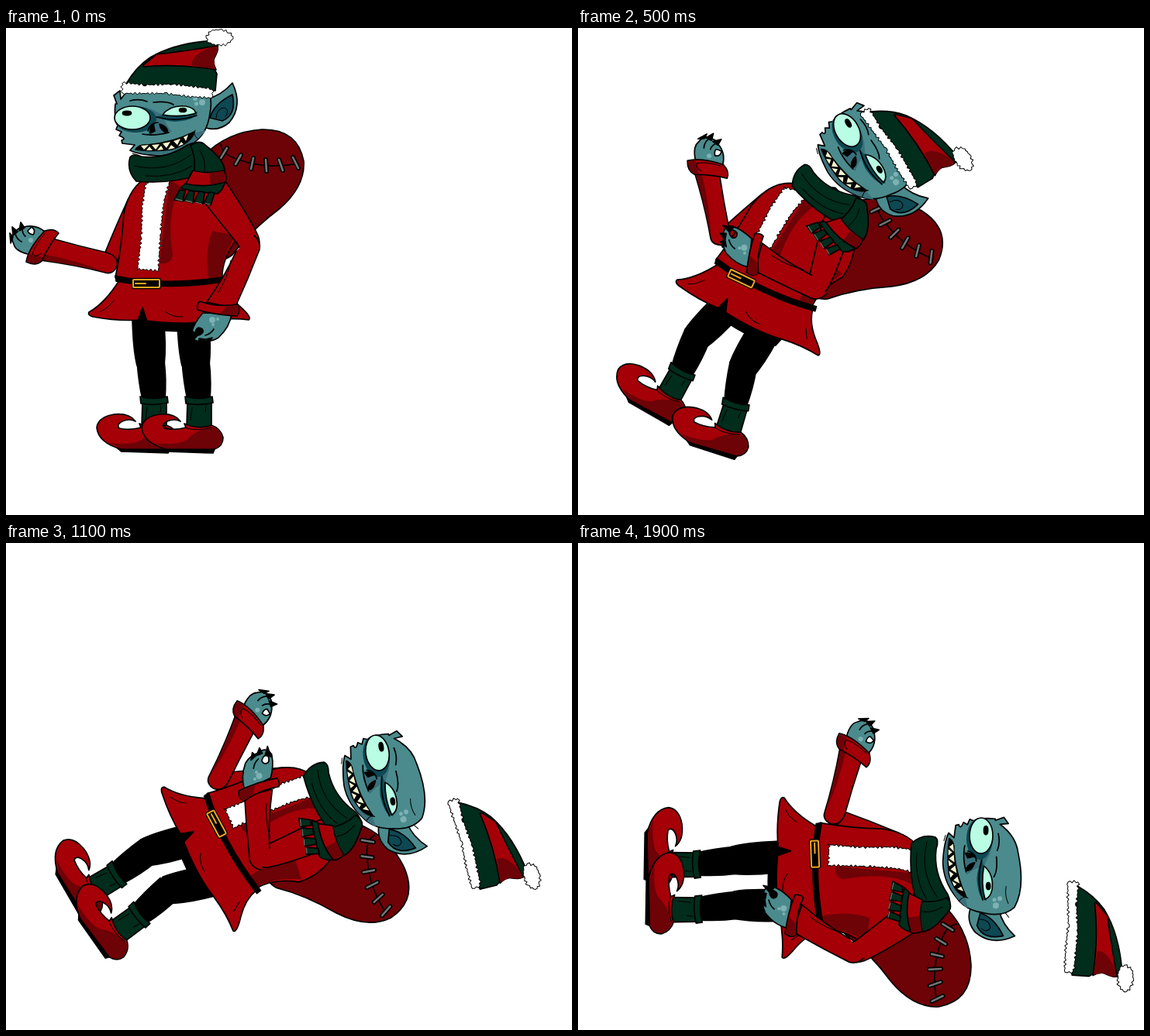
These frames come from a looping animation (730x629 px, 2000 ms). An HTML page:

```html
<!DOCTYPE html>
<html lang="en">
<head>
<meta charset="utf-8">
<title>Falling elf</title>
<style>
html, body { margin: 0; width: 100%; height: 100%; overflow: hidden; background: #fff; }
svg { display: block; width: 730px; height: 629px; stroke: #000; stroke-width: 1.7; stroke-linejoin: round; stroke-linecap: round; }
.red { fill: #a50007; }
.wine { fill: #6d0207; }
.green { fill: #012d1c; }
.skin { fill: #4b8b8d; }
.shade { fill: #39707b; }
.deep { fill: #0d4853; }
.mint { fill: #b9fde4; }
.white { fill: #fff; }
.teeth { fill: #f6f7cf; }
.dots { fill: #7db1b4; }
.flat { stroke: none; }
.line { fill: none; }
.fine { fill: none; stroke-width: 1; }
</style>
</head>
<body>
<svg viewBox="0 0 730 629">
<defs>
  <!-- both legs share these, drawn around the ankle -->
  <path id="thigh" d="M-28-102L12-102Q16-70 13-42Q-4-32-22-42Q-27-62-28-102Z"/>
  <g id="shin">
    <path d="M-22-48Q-20-20-15 2L14 2Q16-25 13-48Q-5-58-22-48Z"/>
    <path class="green" d="M-15 4L-16 38Q0 42 16 36L16 4Z"/>
    <path class="green" d="M-18-2Q0 3 17-2L18 6Q0 10-17 7Z"/>
    <path class="fine" d="M-9 12L-11 28M9 10L8 18"/>
    <path d="M-48 64L20 66L18 71L-42 69Z"/>
    <path class="red" d="M-17 38Q-32 42-45 39Q-49 34-41 30Q-32 26-24 30Q-32 19-52 21Q-72 24-74 38Q-72 58-42 66L20 66Q31 62 31 51Q28 39 16 35Q0 41-19 33Z"/>
    <path class="wine flat" d="M-58 58Q-20 62-12 50Q-2 42 16 37Q28 40 30 51Q30 62 20 65L-42 65Z"/>
    <path class="fine" d="M-16 39Q0 43 15 38"/>
  </g>
  <path id="stitches" d="M285 155L277 168M303 164L296 176M319 168L316 182M335 170L336 185M352 170L357 184M370 167L377 181"/>
</defs>

<!-- sack -->
<g data-pivot="327 168" data-x="327 392 420 453 478 488 470" data-y="168 223 265 341 430 533 542" data-a="0 23 33.5 53.7 67.5 81 90.5">
  <path class="wine" d="M255 165Q285 134 330 131Q376 130 384 172Q386 205 352 234Q315 262 292 293Q270 310 250 285Q235 225 255 165Z"/>
  <path class="line" d="M277 150Q279 164 300 170Q335 183 377 175"/>
  <use href="#stitches" stroke-width="6"/>
  <use href="#stitches" stroke="#737373" stroke-width="2.6"/>
</g>

<!-- far leg -->
<g data-pivot="0 0" data-x="191 150 135 123 145 163 156" data-y="478 461 442 421 427 453 415" data-a="0 20 28 44 58 70 89">
  <g data-pivot="-4 -45" data-a="0 17 20 33 20 29 0"><use href="#thigh"/></g>
  <use href="#shin"/>
</g>
<!-- near leg -->
<g data-pivot="0 0" data-x="249 222 204 169 174 178 158" data-y="478 485 484 469 479 506 473" data-a="0 6 16 35 53 71 89">
  <g data-pivot="-4 -45" data-a="0 18 18 31 29 29 5"><use href="#thigh"/></g>
  <use href="#shin"/>
</g>

<!-- body with both arms -->
<g data-pivot="107 369" data-x="107 117 127 154 202 248 264" data-y="369 342 327 300 316 356 329" data-a="0 15.5 25.5 46.3 61.6 76.7 88">
  <path class="red" d="M158 220Q142 255 127 292L142 304L178 232Z"/>
  <path d="M165 372L262 376L258 389Q215 396 166 385Z"/>
  <path class="red" d="M184 192Q159 204 152 240Q149 285 141 322Q210 338 279 326Q277 300 298 272Q305 235 280 205Q265 180 240 172Z"/>
  <path class="wine flat" d="M262 328Q255 290 266 262L296 268Q276 300 278 325Z"/>
  <path class="wine flat" d="M211 196L226 205Q206 235 215 294Q212 306 198 304Z"/>
  <path class="white" stroke-width="1" data-fur="180 199 175 230 174 270 169 312 197 314 200 262 204 225 213 193"/>
  <path class="red" d="M146 326Q128 355 107 367Q105 371 112 373Q145 379 172 377L176 362L180 378Q230 384 262 378Q290 374 313 377Q318 374 301 359Q284 343 281 325Q210 340 146 326Z"/>
  <path d="M176 361L170 378L182 379Z"/>
  <path class="fine" d="M122 366Q132 362 139 352M284 352L291 364M205 366Q215 374 228 373"/>
  <path d="M141 320Q205 334 284 321L285 327Q210 340 142 327Z"/>
  <rect x="164" y="325" width="34" height="10" rx="1" stroke="#000" stroke-width="4.5"/>
  <rect x="164" y="325" width="34" height="10" rx="1" stroke="#efa524" stroke-width="2"/>
  <path d="M167 330H180" stroke="#efa524" stroke-width="2"/>

  <!-- far forearm -->
  <g data-pivot="135 304" data-y="304 299 294 300 304 304 304" data-a="0 25.5 40 53 41 30 4.6">
    <path class="skin" fill-rule="evenodd" d="M50 263Q38 253 23 257Q16 257 9 266Q6 272 10 279Q12 288 28 292L42 290ZM33 257Q39 261 35 267Q29 266 28 262Z"/>
    <path d="M24 258L19 251L17 262ZM15 263L8 257L9 268ZM9 270L5 265L6 278Z"/>
    <path class="line" d="M21 259Q21 266 25 269M12 266Q14 273 20 276"/>
    <path class="dots flat" d="M29 274a3 3 0 1 0 6 0a3 3 0 1 0-6 0"/>
    <path class="red" d="M60 272Q95 282 130 290Q146 295 143 308Q138 319 128 316Q90 306 44 300Z"/>
    <path class="wine flat" d="M47 292Q92 300 127 315Q90 306 44 299Z"/>
    <path class="red" d="M50 262Q62 258 68 265Q57 278 46 301Q38 308 26 302Q29 284 50 262Z"/>
    <path class="wine flat" d="M29 292L47 296L44 302Q36 306 28 301Z"/>
    <path class="fine" d="M50 266Q38 279 34 292Q38 297 46 291"/>
  </g>

  <!-- near arm -->
  <g data-pivot="256 200" data-a="0 14.5 26.5 40 41.4 27.5 3">
    <path class="red" d="M283 198Q314 244 325 268Q331 284 318 290Q305 293 298 278L258 228Q240 208 256 194Z"/>
    <g data-pivot="315 285" data-a="0 27 41 58.5 49.6 30.6 4.5">
      <path class="skin" fill-rule="evenodd" d="M254 368L291 369Q289 386 274 400Q264 406 254 404Q240 407 239 394Q243 380 254 368ZM248 387Q255 387 254 393Q249 399 244 396Q244 389 248 387Z"/>
      <path d="M241 392L239 406L247 397ZM249 401L249 409L257 402ZM258 402L260 408L266 400Z"/>
      <path class="line" d="M257 397Q264 395 268 389"/>
      <path class="dots flat" d="M262 377a4 4 0 1 0 8 0a4 4 0 1 0-8 0M271 376a2 2 0 1 0 4 0a2 2 0 1 0-4 0M265 383a2 2 0 1 0 4 0a2 2 0 1 0-4 0"/>
      <path class="red" d="M297 288Q284 318 259 354L295 362Q312 325 327 286Q329 276 320 268"/>
      <path class="fine" d="M290 300Q286 322 274 341"/>
      <path class="red" d="M250 353Q272 361 298 357Q304 364 298 372Q270 371 247 364Q246 356 250 353Z"/>
      <path class="wine flat" d="M284 360L299 358Q303 365 297 371L276 369Z"/>
    </g>
  </g>
</g>

<!-- head -->
<g data-pivot="163 116" data-x="163 286 347 415 479 522 520" data-y="116 110 132 188 271 372 378" data-a="0 43.2 59.3 71 81.2 90.3 90.7">
  <path class="skin" d="M258 92Q277 88 292 71Q306 100 288 122Q274 134 258 129Z"/>
  <path class="deep" d="M263 116Q268 98 292 86Q298 112 279 120Z"/>
  <path class="fine" d="M271 116Q272 103 282 103Q289 107 283 114"/>
  <path class="skin" d="M143 98L139 87L147 81L148 92Q163 71 185 68Q230 58 255 72Q268 86 263 110Q260 136 242 148Q222 164 198 165Q172 164 160 158L166 151L150 149L149 145Q156 143 146 139L149 134L142 131L144 126Q139 116 141 98Z"/>
  <path class="shade flat" d="M164 158Q210 162 244 135L258 132Q244 150 222 159Q194 168 164 158ZM184 103Q200 119 182 137Q194 142 214 134Q205 124 202 112Z"/>
  <ellipse class="deep flat" cx="167" cy="118" rx="27" ry="17"/>
  <ellipse class="mint" cx="163" cy="116" rx="23" ry="15"/>
  <ellipse cx="156" cy="110" rx="5.5" ry="2.6"/>
  <path class="deep flat" d="M194 114Q220 110 247 108Q246 119 218 121Q204 120 194 114Z"/>
  <path class="mint" d="M202 112Q212 99 232 101Q243 103 245 110Q225 116 202 112Z"/>
  <ellipse cx="228" cy="106" rx="4.5" ry="2.5"/>
  <path class="line" d="M194 115Q220 122 246 113M190 96Q208 94 216 99M176 137Q190 140 210 135M182 95Q172 91 160 94"/>
  <path d="M190 124Q184 131 186 136L192 133ZM198 124Q200 134 208 135Q210 128 198 124Z"/>
  <path class="line" d="M183 133Q186 122 196 122"/>
  <path d="M167 157Q172 150 182 151Q215 148 243 134Q239 149 213 157Q188 160 167 157Z"/>
  <path class="teeth flat" d="M174 152l4 5 6-6zM188 151l5 6 5-7zM202 149l5 6 5-8zM216 146l5 5 4-8zM229 141l3 5 3-8zM181 158l4-5 4 5zM195 158l5-6 3 5zM209 157l4-6 5 4zM222 153l4-6 3 3z"/>
  <path class="fine" d="M244 132Q240 136 247 143M228 83Q240 85 250 80M262 84L268 79M170 164L163 162"/>
  <path class="dots flat" d="M241 91a3 3 0 1 0 6 0a3 3 0 1 0-6 0M249 96a4 4 0 1 0 8 0a4 4 0 1 0-8 0M243 98a2 2 0 1 0 5 0a2 2 0 1 0-5 0"/>
</g>

<!-- scarf -->
<g data-pivot="158 178" data-x="158 237 283 341 399 446 450" data-y="178 178 183 215 285 375 378" data-a="0 27 44 60 70 82 90">
  <path class="green" d="M160 167Q164 162 175 166Q206 170 234 151Q254 142 262 162Q265 180 250 189Q215 202 168 198Q155 184 160 167Z"/>
  <path class="green" d="M238 152Q250 143 258 152Q284 172 282 188L242 188Q246 170 238 152Z"/>
  <path class="fine" d="M166 178Q206 188 238 164M180 191Q216 194 240 178M250 158Q258 170 256 184"/>
  <path class="red" d="M241 184Q262 189 281 184Q288 196 278 206L231 203Z"/>
  <path class="wine flat" d="M262 187L280 185Q286 196 277 205L264 204Z"/>
  <path class="green" d="M231 201Q258 207 282 199Q281 208 273 214Q246 212 225 207Z"/>
  <path class="green" d="M224 209L217 222L228 224L231 210ZM236 210L230 223L241 226L243 211ZM249 211L243 224L254 227L256 212ZM262 212L256 225L264 229L269 213Z"/>
  <path stroke="#66736c" stroke-width="1.3" d="M219 221L227 223M232 223L240 225M245 225L252 227M257 226L263 228"/>
</g>

<!-- hat -->
<g data-pivot="150 77" data-x="150 297 370 467 577 634 639" data-y="77 77 107 191 332 447 438" data-a="0 38 53.5 58.7 71.5 84 89">
  <path class="green" d="M155 72Q168 50 186 38Q220 18 272 16Q276 22 268 40Q266 50 272 59L270 81Z"/>
  <path class="red" d="M177 48L194 34Q230 30 272 23Q276 26 268 40Q267 47 271 54Q225 46 177 50Z"/>
  <path class="wine flat" d="M240 48Q238 36 262 26L272 24Q276 27 268 40L270 53Z"/>
  <path class="white" stroke-width="1" data-fur="150 71 180 74 215 73 266 79 266 90 235 88 205 84 150 84"/>
  <path class="white" stroke-width="1" data-fur="258 13 264 4 276 2 288 6 293 13 285 21 273 22 262 19"/>
</g>
</svg>

<script>
const KEY_TIMES = [0, 300, 500, 900, 1100, 1400, 1900];
const LOOP = 2000, STEP = 100;
const LANDING = 4; // segment in which the body hits the ground

const numbers = text => text && text.split(' ').map(Number);

// Turns a polygon into a ragged, furry outline.
function furPath(points) {
  const out = [];
  for (let i = 0; i < points.length; i += 2) {
    const [x, y] = [points[i], points[i + 1]];
    const dx = points[(i + 2) % points.length] - x;
    const dy = points[(i + 3) % points.length] - y;
    const length = Math.hypot(dx, dy), count = Math.ceil(length / 2.8);
    for (let j = 0; j < count; j++) {
      const bump = (j % 2 ? 1.4 : -0.4) + Math.sin(i * 5 + j * 2.3) * 0.7;
      out.push([x + dx * j / count + dy / length * bump, y + dy * j / count - dx / length * bump]);
    }
  }
  return 'M' + out.map(p => p.map(v => v.toFixed(1))).join('L') + 'Z';
}

for (const fur of document.querySelectorAll('[data-fur]'))
  fur.setAttribute('d', furPath(numbers(fur.dataset.fur)));

const joints = [...document.querySelectorAll('[data-pivot]')].map(node => {
  const { pivot, x, y, a } = node.dataset;
  return { node, pivot: numbers(pivot), x: numbers(x), y: numbers(y), a: numbers(a) };
});

function pose(time) {
  const next = KEY_TIMES.findIndex(key => key > time);
  const i = next - 1;
  let u = (time - KEY_TIMES[i]) / (KEY_TIMES[next] - KEY_TIMES[i]);
  if (i === LANDING) u = 1 - (1 - u) ** 4;
  const mix = keys => keys[i] + (keys[next] - keys[i]) * u;
  for (const { node, pivot: [px, py], x, y, a } of joints) {
    const tx = x ? mix(x) : px, ty = y ? mix(y) : py;
    node.setAttribute('transform', `translate(${tx} ${ty}) rotate(${mix(a)}) translate(${-px} ${-py})`);
  }
}

const start = performance.now();
function frame() {
  const time = Math.floor((performance.now() - start) % LOOP / STEP) * STEP;
  pose(Math.min(time, KEY_TIMES.at(-1) - 0.01));
  requestAnimationFrame(frame);
}
frame();
</script>
</body>
</html>
```
